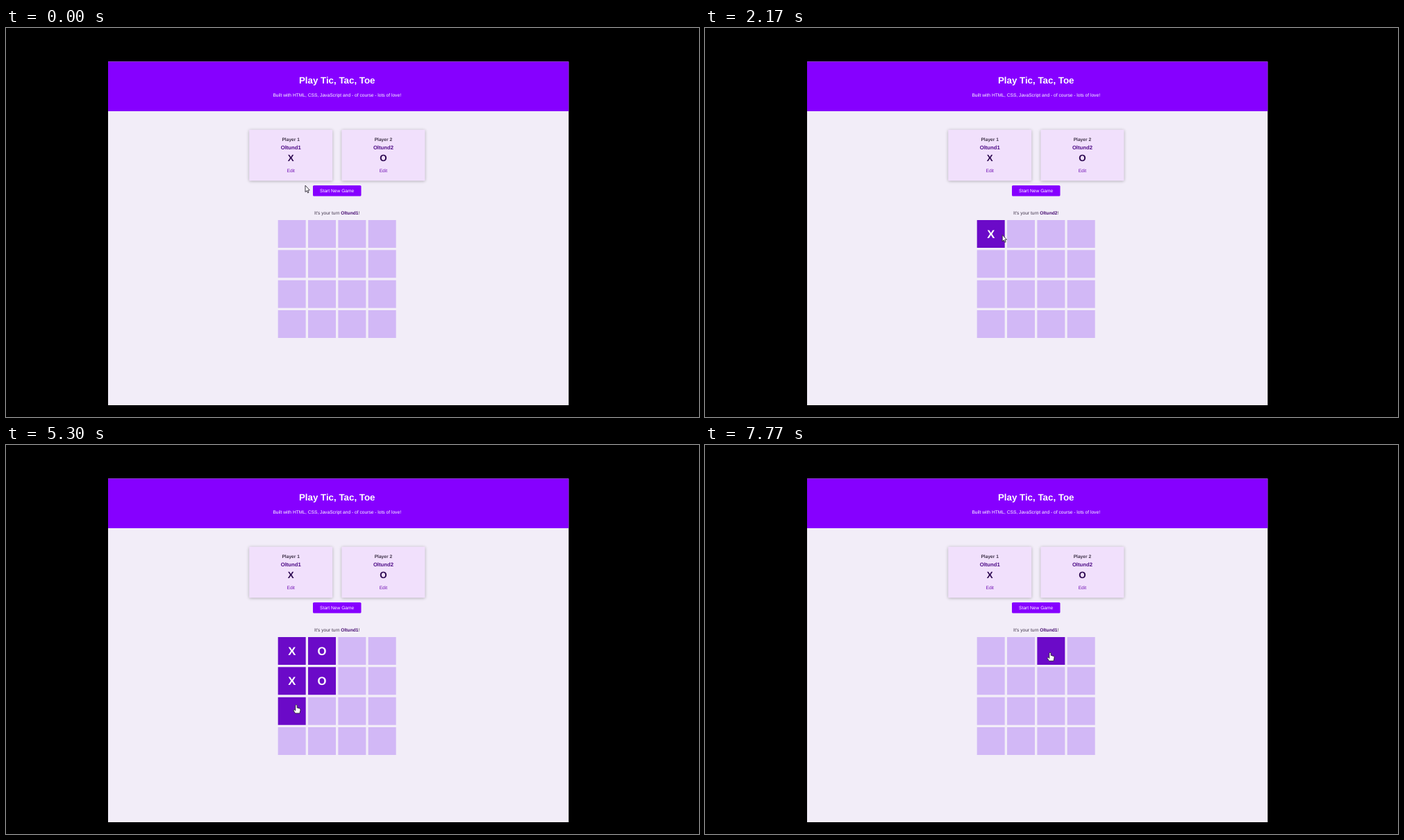
These frames come from a looping animation (998 px wide and 561 px high, 8000 ms). An HTML page with a canvas:

```html
<!DOCTYPE html>
<html lang="en">
<head>
<meta charset="utf-8">
<title>Tic, Tac, Toe</title>
<style>
  html, body { margin: 0; width: 100%; height: 100%; overflow: hidden; background: #000; }
  canvas { display: block; width: 998px; height: 561px; }
</style>
</head>
<body>
<canvas id="stage" width="998" height="561"></canvas>
<script>
const ctx = document.getElementById('stage').getContext('2d');
const LOOP = 8000;
const MID = 476.7;
const PLAYERS = ['Oltund1', 'Oltund2'];
const BODY = 6.67;

const WIN_AT = 5330, RESET_AT = 7200;
const BOARD = { x: 391.7, y: 277, size: 40, pitch: 43.33, shift: 63.8 };
const BUTTON = { x: 442, y: 227, w: 69.5, h: 15.5 };

// [time, cell index]; marks alternate X, O
const MOVES = [[1530, 0], [2700, 1], [3670, 4], [4430, 5], [WIN_AT, 8]];

const EASE = {
  both: p => p * p * (3 - 2 * p),
  in: p => p ** 1.6,
  out: p => 1 - (1 - p) ** 1.6
};

// Pointer travel: start, end, target x, target y, easing
const START = [431, 227];
const TRAVEL = [
  [30, 570, 411, 302, 'both'],
  [1070, 1100, 409.7, 304, 'both'],
  [1100, 1130, 409.5, 303, 'both'],
  [1300, 1330, 409.5, 303.5, 'both'],
  [1530, 1870, 427, 298, 'both'],
  [2140, 2400, 457, 307, 'both'],
  [2700, 2970, 430.7, 327, 'in'],
  [2970, 3170, 412, 344, 'out'],
  [3670, 4030, 456.5, 344, 'both'],
  [4430, 5000, 418, 374.5, 'both'],
  [5740, 6400, 483.7, 371, 'in'],
  [6400, 6570, 504, 299, 'out'],
  [6570, 6900, 480, 233.5, 'both'],
  [7370, 7770, 497, 299, 'both']
];

const HAND = new Path2D('M-1.2 1Q0-1 1.2 1V4.4L5 5.4Q6.3 6 6 8L5 12.4H-1.5L-4 8.5Q-4 7-2.6 7.3L-1.2 8.6Z');
const ARROW = new Path2D('M0 0V9.5L2.1 7.6L3.6 10.8L5 10.1L3.6 7.1L6.3 6.9Z');

function pointerAt(t) {
  let [x, y] = START;
  for (const [from, to, tx, ty, ease] of TRAVEL) {
    if (t < from) break;
    const p = EASE[ease](Math.min(1, (t - from) / (to - from)));
    x += (tx - x) * p;
    y += (ty - y) * p;
  }
  return { x, y };
}

function inside(p, x, y, w, h) {
  return p.x >= x && p.x <= x + w && p.y >= y && p.y <= y + h;
}

function box(x, y, w, h, color, radius = 0, shadow = 0) {
  ctx.save();
  if (shadow) {
    ctx.shadowColor = `rgba(0,0,0,${shadow})`;
    ctx.shadowBlur = 4;
    ctx.shadowOffsetY = 0.8;
  }
  ctx.fillStyle = color;
  ctx.beginPath();
  ctx.roundRect(x, y, w, h, radius);
  ctx.fill();
  ctx.restore();
}

function setFont(size, bold) {
  ctx.font = `${bold ? 'bold ' : ''}${size}px "Liberation Sans", Arial, sans-serif`;
}

function text(str, x, y, size, color, bold = false) {
  setFont(size, bold);
  ctx.textAlign = 'center';
  ctx.fillStyle = color;
  ctx.fillText(str, x, y);
}

// Centred line made of [string, bold, color] pieces
function richLine(parts, x, y, size) {
  const widths = parts.map(([str, bold]) => {
    setFont(size, bold);
    return ctx.measureText(str).width;
  });
  let left = x - widths.reduce((a, b) => a + b) / 2;
  ctx.textAlign = 'left';
  parts.forEach(([str, bold, color], i) => {
    setFont(size, bold);
    ctx.fillStyle = color;
    ctx.fillText(str, left, y);
    left += widths[i];
  });
}

function drawCard(x, index) {
  const mid = x + 60;
  box(x, 146.7, 120, 73.5, '#f1e0fc', 1, 0.28);
  text('Player ' + (index + 1), mid, 163, BODY, '#40344a', true);
  text(PLAYERS[index], mid, 175, 7.7, '#4d0a86', true);
  text('XO'[index], mid, 191.8, 13.33, '#2c0850', true);
  text('Edit', mid, 208.2, BODY, '#7212b4');
}

function drawPage(overButton) {
  ctx.fillStyle = '#000';
  ctx.fillRect(0, 0, 998, 561);
  box(147, 48.5, 663.3, 495.5, '#f2edf8');
  box(147, 48.5, 663.3, 71.5, '#8600ff');
  text('Play Tic, Tac, Toe', MID, 80.4, 13.33, '#fff', true);
  text('Built with HTML, CSS, JavaScript and - of course - lots of love!', MID, 98.8, BODY, '#fff');
  drawCard(350.2, 0);
  drawCard(483.4, 1);
  box(BUTTON.x, BUTTON.y, BUTTON.w, BUTTON.h, overButton ? '#6b07c9' : '#8600ff', 1.6);
  text('Start New Game', MID, 237.4, BODY, '#fff');
}

function drawBanner() {
  box(330.2, 262.5, 293, 57, '#2f0156', 1.5, 0.35);
  text(`You Won, ${PLAYERS[0]}!`, MID, 288, 16.67, '#f8f0ff', true);
  text('Click "Start New Game" above, to a start new game!', MID, 304.4, BODY, '#fff');
}

function drawPointer(p, hand) {
  ctx.save();
  ctx.translate(p.x, p.y);
  const shape = hand ? HAND : ARROW;
  ctx.lineJoin = 'round';
  ctx.lineWidth = 0.9;
  ctx.strokeStyle = '#2a2432';
  ctx.fillStyle = '#fff';
  ctx.fill(shape);
  ctx.stroke(shape);
  ctx.restore();
}

function draw(t) {
  const p = pointerAt(t);
  const played = t < RESET_AT ? MOVES.filter(([at]) => t >= at) : [];
  const won = t >= WIN_AT && t < RESET_AT;
  const shift = won ? BOARD.shift : 0;
  const overButton = inside(p, BUTTON.x, BUTTON.y, BUTTON.w, BUTTON.h);
  let hand = overButton;

  drawPage(overButton);
  if (won) drawBanner();
  richLine([
    ["It's your turn ", false, '#40344a'],
    [PLAYERS[played.length % 2], true, '#450a70'],
    ['!', false, '#40344a']
  ], MID, 268.6 + shift, BODY);

  for (let i = 0; i < 16; i++) {
    const x = BOARD.x + (i % 4) * BOARD.pitch;
    const y = BOARD.y + shift + Math.floor(i / 4) * BOARD.pitch;
    const turn = played.findIndex(([, cell]) => cell === i);
    const taken = turn >= 0;
    const hover = inside(p, x, y, BOARD.size, BOARD.size);
    if (hover && !taken) hand = true;
    box(x, y, BOARD.size, BOARD.size, taken || hover ? '#6b0ac8' : '#d2b8f6');
    if (taken) text('XO'[turn % 2], x + 20, y + 25.8, 16.67, '#fff', true);
  }
  drawPointer(p, hand);
}

ctx.textRendering = 'geometricPrecision';
const begin = performance.now();
function tick() {
  draw((performance.now() - begin) % LOOP);
  requestAnimationFrame(tick);
}
tick();
</script>
</body>
</html>
```
